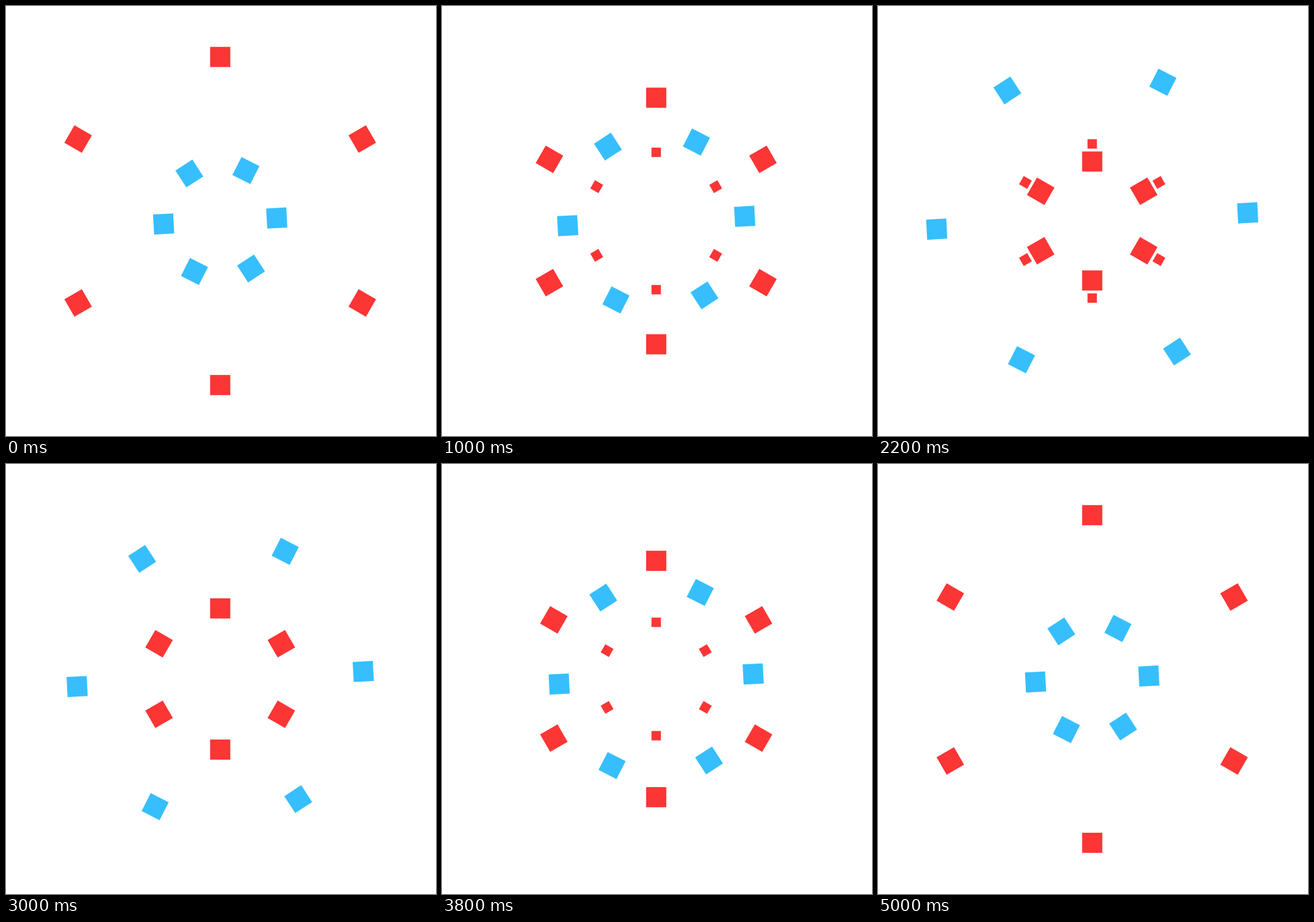
Recreate the animation shown at these times as an HTML page with a canvas. Size 640 by 640 pixels, loop 5.1 s.

```html
<!DOCTYPE html>
<html lang="en">
<head>
<meta charset="utf-8">
<title>Pulsing squares</title>
<style>
  html, body { margin: 0; width: 100%; height: 100%; overflow: hidden; background: #fff; }
  canvas { display: block; width: 640px; height: 640px; }
</style>
</head>
<body>
<canvas id="stage" width="640" height="640"></canvas>
<script>
const ctx = document.getElementById('stage').getContext('2d');
const LOOP = 5100, STEP = 100;
const CENTER = { x: 318.8, y: 320 };
const RED = '#fc3535', BLUE = '#36bffc';
const NEAR = 84.3, FAR = 244.3;

// Cubic bezier easing with flat ends; x1 and x2 are the handle positions.
function ease(x, x1, x2) {
  let lo = 0, hi = 1;
  for (let i = 0; i < 30; i++) {
    const s = (lo + hi) / 2, q = 1 - s;
    if (3 * x1 * s * q * q + 3 * x2 * s * s * q + s * s * s < x) lo = s;
    else hi = s;
  }
  return lo * lo * (3 - 2 * lo);
}

// Keys are [time, radius]; each segment is eased on its own.
function track(keys, t, handles = () => [1 / 3, 2 / 3]) {
  let i = 0;
  while (i < keys.length - 2 && t >= keys[i + 1][0]) i++;
  const [t0, r0] = keys[i], [t1, r1] = keys[i + 1];
  const x = Math.min(1, Math.max(0, (t - t0) / (t1 - t0)));
  return r0 + (r1 - r0) * ease(x, ...handles(i));
}

const rings = [
  { color: RED, size: 14, turn: 30,
    radius: t => track([[0, FAR], [1264, 84.2], [2510, 120.3], [3775, 84.2], [5000, FAR]], t) },
  { color: BLUE, size: 30, turn: -3,
    radius: t => track([[0, NEAR], [2480, FAR], [4960, NEAR], [7440, FAR]], t,
      i => i % 2 ? [1 / 6, 2 / 3] : [1 / 3, 5 / 6]) },
  { color: RED, size: 30, turn: 30,
    radius: t => track([[-40, FAR], [2440, NEAR], [4920, FAR], [7400, NEAR]], t) }
];

function drawRing({ color, size, turn, radius }, t) {
  const r = radius(t);
  ctx.fillStyle = color;
  for (let k = 0; k < 6; k++) {
    ctx.save();
    ctx.translate(CENTER.x, CENTER.y);
    ctx.rotate((turn + 60 * k) * Math.PI / 180);
    ctx.fillRect(r - size / 2, -size / 2, size, size);
    ctx.restore();
  }
}

const start = performance.now();

function draw() {
  const elapsed = Math.max(0, performance.now() - start) % LOOP;
  const t = Math.floor(elapsed / STEP) * STEP;
  ctx.fillStyle = '#fff';
  ctx.fillRect(0, 0, 640, 640);
  rings.forEach(ring => drawRing(ring, t));
  requestAnimationFrame(draw);
}
draw();
</script>
</body>
</html>
```
